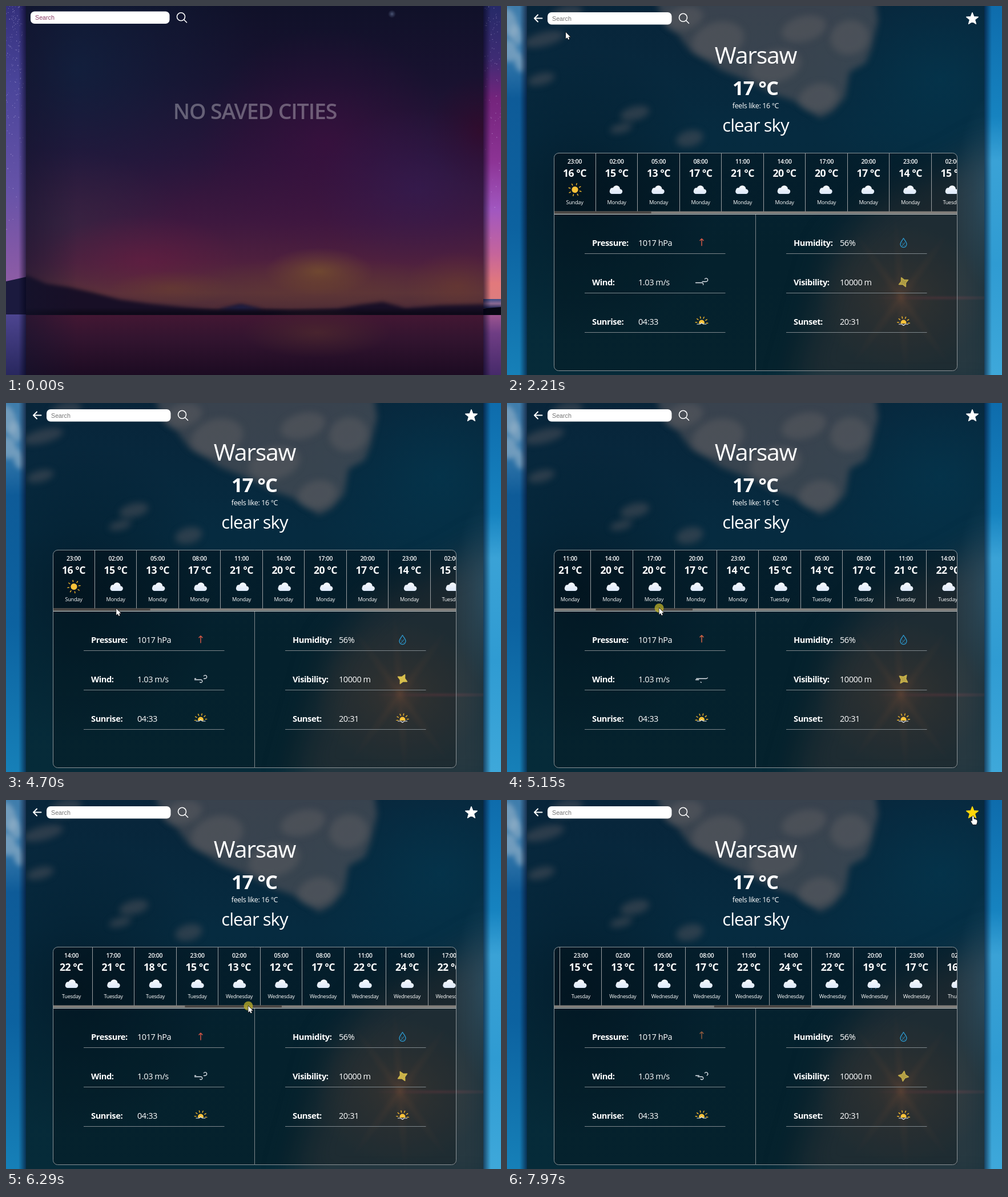
Recreate the animation shown at these times as an HTML page with a canvas. Size 867 px wide and 646 px high, loop 8 s.

```html
<!DOCTYPE html>
<html lang="en">
<head>
<meta charset="utf-8">
<title>Weather</title>
<style>
  html, body { margin: 0; width: 100%; height: 100%; overflow: hidden; background: #10122e; }
  canvas { display: block; }
</style>
</head>
<body>
<canvas id="stage" width="867" height="646"></canvas>
<script>
const W = 867, H = 646, LOOP = 8000, PANEL = { x: 35, w: 801 };
const ctx = document.getElementById('stage').getContext('2d');
const SANS = '"Open Sans", "Noto Sans", sans-serif', ARIAL = '"Liberation Sans", Arial, sans-serif';
const TAU = Math.PI * 2, LOAD = 1250, READY = 1940, GRAB = 4880, RELEASE = 6950, SAVE = 7600;

const clamp = (v, a, b) => Math.min(b, Math.max(a, v));
const ease = p => p * p * (3 - 2 * p);

function randomizer(seed) {
  return () => (seed = (seed * 16807) % 2147483647) / 2147483647;
}

// Interpolates rows of [time, x, y] with a soft start and end.
function along(keys, t) {
  const i = keys.findIndex(k => k[0] > t);
  if (i < 0) return keys.at(-1).slice(1);
  const a = keys[i - 1], b = keys[i], p = ease((t - a[0]) / (b[0] - a[0]));
  return [a[1] + (b[1] - a[1]) * p, a[2] + (b[2] - a[2]) * p];
}

/* ---------- backgrounds, painted once ---------- */

function gradient(c, x0, y0, x1, y1, stops) {
  const g = c.createLinearGradient(x0, y0, x1, y1);
  stops.forEach(([p, color]) => g.addColorStop(p, color));
  return g;
}

function band(c, x, y, w, h, stops, sideways) {
  c.fillStyle = gradient(c, x, y, sideways ? x + w : x, sideways ? y : y + h, stops);
  c.fillRect(x, y, w, h);
}

function glow(c, x, y, rx, ry, rgb, alpha) {
  c.save();
  c.translate(x, y);
  c.scale(rx, ry);
  const g = c.createRadialGradient(0, 0, 0, 0, 0, 1);
  g.addColorStop(0, `rgba(${rgb},${alpha})`);
  g.addColorStop(0.5, `rgba(${rgb},${alpha * 0.45})`);
  g.addColorStop(1, `rgba(${rgb},0)`);
  c.fillStyle = g;
  c.fillRect(-1, -1, 2, 2);
  c.restore();
}

function polygon(c, points, color) {
  c.beginPath();
  points.forEach(p => c.lineTo(...p));
  c.fillStyle = color;
  c.fill();
}

function puffs(c, list, color) {
  c.fillStyle = color;
  list.forEach(([x, y, rx, ry]) => {
    c.beginPath();
    c.ellipse(x, y, rx, ry, -0.25, 0, TAU);
    c.fill();
  });
}

function paintScene(paintSides, paintPanel) {
  const canvas = document.createElement('canvas');
  canvas.width = W;
  canvas.height = H;
  const c = canvas.getContext('2d');
  paintSides(c);
  band(c, 22, 0, 13, H, [[0, 'rgba(0,0,20,0)'], [1, 'rgba(0,0,20,.6)']], true);
  band(c, 836, 0, 13, H, [[0, 'rgba(0,0,20,.6)'], [1, 'rgba(0,0,20,0)']], true);
  c.save();
  c.beginPath();
  c.rect(PANEL.x, 0, PANEL.w, H);
  c.clip();
  paintPanel(c);
  c.restore();
  return canvas;
}

function nightSides(c) {
  band(c, 0, 0, 40, 540, [[0, '#34307c'], [0.25, '#4a459a'], [0.6, '#6653a8'], [0.8, '#8258a6'], [1, '#9a62a4']]);
  band(c, 830, 0, 37, 540, [[0, '#262a68'], [0.17, '#3e2c74'], [0.3, '#74247c'], [0.5, '#8c3394'],
    [0.66, '#a157c0'], [0.8, '#c4649c'], [0.9, '#e2797c'], [1, '#d88080']]);
  band(c, 836, 513, 31, 16, [[0, '#3a4c86'], [0.5, '#8c6a92'], [1, '#1b2450']]);
  polygon(c, [[830, 530], [867, 527], [867, 541], [830, 541]], '#070713');
  const rnd = randomizer(71);
  for (let i = 0; i < 240; i++) {
    const right = i % 3 === 0;
    c.fillStyle = `rgba(225,215,255,${0.15 + rnd() * 0.55})`;
    c.fillRect(right ? 838 + rnd() * 29 : rnd() * 30, rnd() * rnd() * 460, 1, 1);
  }
  polygon(c, [[0, 482], [14, 479], [36, 474], [36, 541], [0, 541]], '#1b1a3e');
  band(c, 0, 540, 40, 106, [[0, '#4d4590'], [1, '#28275e']]);
  band(c, 830, 541, 37, 105, [[0, '#9c5590'], [0.3, '#6f3d84'], [1, '#462a6a']]);
}

function nightPanel(c) {
  band(c, 0, 0, W, 540, [[0, '#101129'], [0.25, '#191230'], [0.5, '#2a143a'], [0.7, '#3e183f'],
    [0.83, '#4f203e'], [0.93, '#59323a'], [1, '#4a2a36']]);
  glow(c, 120, 110, 330, 300, '16,36,66', 0.7);
  glow(c, 90, 380, 220, 130, '54,42,66', 0.6);
  glow(c, 560, 240, 220, 200, '70,14,66', 0.5);
  glow(c, 830, 220, 90, 100, '60,4,36', 0.5);
  glow(c, 720, 320, 180, 140, '52,30,88', 0.5);
  glow(c, 240, 445, 170, 80, '108,28,66', 0.5);
  glow(c, 548, 465, 95, 42, '124,86,46', 0.75);
  glow(c, 550, 490, 240, 50, '104,62,44', 0.45);
  glow(c, 290, 494, 110, 30, '110,70,42', 0.45);
  glow(c, 790, 490, 90, 60, '112,62,44', 0.5);
  glow(c, 676, 14, 7, 7, '130,150,190', 0.5);
  c.filter = 'blur(3px)';
  polygon(c, [[20, 470], [40, 473], [70, 486], [110, 492], [150, 501], [200, 514], [250, 521], [310, 527], [370, 532],
    [410, 523], [450, 531], [500, 533], [580, 530], [620, 523], [660, 518], [700, 529], [760, 524], [850, 522],
    [850, 545], [20, 545]], '#180f26');
  polygon(c, [[370, 532], [412, 523], [450, 532]], '#1e2046');
  c.filter = 'none';
  band(c, 0, 528, W, 14, [[0, 'rgba(12,8,22,0)'], [0.7, 'rgba(12,8,22,.85)'], [1, 'rgba(12,8,22,.8)']]);
  band(c, 0, 541, W, 105, [[0, '#431733'], [0.4, '#32142f'], [1, '#1c0b22']]);
  glow(c, 545, 572, 130, 44, '86,48,44', 0.55);
  band(c, 35, 0, 90, H, [[0, 'rgba(18,20,46,.5)'], [1, 'rgba(18,20,46,0)']], true);
}

function daySides(c) {
  band(c, 0, 0, 40, H, [[0, '#3f7dac'], [0.12, '#3a7cae'], [0.25, '#0e5b98'], [0.6, '#0c62a0'], [1, '#1680b8']]);
  band(c, 830, 0, 37, H, [[0, '#0e6cac'], [0.3, '#1683c0'], [0.42, '#3aa2d6'], [0.7, '#2f9bd2'], [1, '#3ea8da']]);
  c.filter = 'blur(4px)';
  puffs(c, [[4, 30, 14, 26], [16, 50, 10, 18], [2, 78, 16, 20], [22, 98, 9, 18]], 'rgba(150,178,200,.6)');
  c.filter = 'none';
}

function dayPanel(c) {
  band(c, 0, 0, W, H, [[0, '#08253a'], [0.35, '#062b40'], [0.7, '#052a39'], [1, '#062b39']]);
  glow(c, 760, 130, 240, 220, '3,56,80', 0.65);
  glow(c, 130, 330, 240, 260, '2,22,36', 0.6);
  c.filter = 'blur(6px)';
  polygon(c, [[262, -10], [645, -10], [650, 25], [638, 75], [628, 100], [600, 115], [592, 160], [570, 185], [548, 196],
    [525, 180], [500, 165], [470, 155], [440, 140], [410, 126], [375, 112], [345, 92], [322, 80], [300, 50], [272, 28]],
    'rgba(90,88,92,.6)');
  puffs(c, [[600, 55, 34, 30], [545, 160, 34, 24], [470, 105, 46, 28], [370, 60, 46, 32], [310, 22, 34, 20],
    [520, 40, 40, 22]], 'rgba(104,100,102,.4)');
  puffs(c, [[320, 232, 24, 14], [224, 188, 26, 12], [200, 214, 20, 8], [65, 58, 36, 12], [105, 14, 28, 15],
    [60, 128, 24, 10]], 'rgba(92,90,96,.45)');
  c.filter = 'blur(28px)';
  polygon(c, [[860, 235], [790, 280], [650, 340], [570, 430], [500, 680], [860, 680]], 'rgba(72,70,72,.5)');
  c.filter = 'none';
  glow(c, 845, 330, 60, 170, '56,100,124', 0.5);
  glow(c, 690, 510, 150, 130, '104,74,58', 0.42);
  glow(c, 690, 510, 40, 40, '116,82,64', 0.3);
  glow(c, 760, 511, 120, 5, '130,70,80', 0.4);
  for (const angle of [0.95, 1.5, 2.2]) {
    c.save();
    c.translate(690, 510);
    c.rotate(angle);
    glow(c, 0, 0, 140, 10, '130,90,66', 0.2);
    c.restore();
  }
}

const night = paintScene(nightSides, nightPanel), day = paintScene(daySides, dayPanel);

/* ---------- drawing helpers ---------- */

function text(str, x, y, size, { weight = 400, align = 'center', color = '#fff', family = SANS } = {}) {
  ctx.font = `${weight} ${size}px ${family}`;
  ctx.letterSpacing = family === SANS ? `${-0.03 * size}px` : '0px';
  ctx.textAlign = align;
  ctx.fillStyle = color;
  ctx.fillText(str, x, y);
}

function box(x, y, w, h, r, fill, stroke) {
  ctx.beginPath();
  ctx.roundRect(x, y, w, h, r);
  if (fill) { ctx.fillStyle = fill; ctx.fill(); }
  if (stroke) { ctx.strokeStyle = stroke; ctx.lineWidth = 1; ctx.stroke(); }
}

function rect(x, y, w, h, color) {
  ctx.fillStyle = color;
  ctx.fillRect(x, y, w, h);
}

function disc(x, y, r, color) {
  ctx.beginPath();
  ctx.arc(x, y, r, 0, TAU);
  ctx.fillStyle = color;
  ctx.fill();
}

function line(d, color, width) {
  ctx.strokeStyle = color;
  ctx.lineWidth = width;
  ctx.lineCap = ctx.lineJoin = 'round';
  ctx.stroke(new Path2D(d));
}

function at(x, y, angle, draw) {
  ctx.save();
  ctx.translate(x, y);
  ctx.rotate(angle);
  draw();
  ctx.restore();
}

function star(points, outer, inner, color) {
  ctx.beginPath();
  for (let i = 0; i < points * 2; i++) {
    const r = i % 2 ? inner : outer, a = i * Math.PI / points - Math.PI / 2;
    ctx.lineTo(r * Math.cos(a), r * Math.sin(a));
  }
  ctx.closePath();
  ctx.fillStyle = ctx.strokeStyle = color;
  ctx.lineJoin = 'round';
  ctx.lineWidth = 1.5;
  ctx.fill();
  ctx.stroke();
}

function searchBar(x, y, w, value, color, caret) {
  box(x, y, w, 21.5, 7, '#fff');
  text(value, x + 8, y + 14.5, 10.7, { align: 'left', color, family: ARIAL });
  if (caret) rect(x + 9 + ctx.measureText(value).width, y + 4, 1, 13, '#222');
  at(x + w + 20, y + 9.3, 0, () => line('M7 0A7 7 0 1 1-7 0A7 7 0 1 1 7 0M5 5L10 10', '#fff', 1.6));
}

/* ---------- weather icons ---------- */

function rays(from, to, count, start, step) {
  for (let i = 0; i < count; i++) {
    const a = start + i * step, c = Math.cos(a), s = Math.sin(a);
    line(`M${c * from} ${s * from}L${c * to} ${s * to}`, '#f5b92c', 1.4);
  }
}

function sunIcon(x, y, t) {
  at(x, y, t / 6000 * Math.PI / 4, () => {
    disc(0, 0, 5.6, '#fac23a');
    rays(8.7, 11.3, 8, 0, Math.PI / 4);
  });
}

function cloudIcon(x, y, rain, t) {
  const color = gradient(ctx, x, y - 8, x, y + 8, [[0, '#f8fafe'], [1, '#dbe7f8']]);
  if (rain) {
    for (let i = 0; i < 3; i++) {
      const p = (t / 700 + i * 0.37) % 1;
      at(x - 4 + i * 4, y + 6 + p * 5, 0, () => line('M0 0L-.7 2', `rgba(60,150,220,${1 - p})`, 1));
    }
  }
  box(x - 11, y - 1.5, 22.5, 8.5, 4.2, color);
  disc(x - 6, y + 0.5, 4.3, color);
  disc(x + 1, y - 1.5, 6.3, color);
}

function pressureIcon(t) {
  const p = ((t + 2230) % 2600) / 2600, fade = Math.min(1, p * 8, 0.3 + (1 - p) * 5);
  at(341, 414 - 3.5 * p ** 6, 0, () =>
    line('M0 6V-6M-3-3L0-6L3-3', `rgba(232,${90 + 70 * p ** 8},72,${0.9 * fade})`, 1.5));
}

function windIcon(t) {
  const travel = (t - 4700) / 795 * 34;
  ctx.save();
  ctx.setLineDash([20, 14]);
  ctx.lineDashOffset = -travel - 16;
  line('M330.5 482.5H349A2.9 2.9 0 1 0 346.4 478', '#e4e8ee', 1.3);
  ctx.lineDashOffset = -travel;
  line('M330.5 484.5H341.5A2.5 2.5 0 1 1 339.3 488.5', '#e4e8ee', 1.3);
  ctx.restore();
}

function humidityIcon() {
  line('M694.5 406.5C692 411 689 413.5 689 417A5.5 5.5 0 0 0 700 417C700 413.5 697 411 694.5 406.5Z', '#2c93c6', 1.4);
  line('M696.5 414.5L692.5 419.5M692.4 415V415.2M696.7 419V419.2', '#2c93c6', 1.2);
}

function visibilityIcon(t) {
  ctx.globalAlpha = 0.8 + 0.2 * Math.cos((t - 4700) / 1900 * TAU);
  at(694.5, 483.5, (t - 3410) * 0.0214 * Math.PI / 180, () => star(4, 9, 4.2, '#d8bf4c'));
  ctx.globalAlpha = 1;
}

function horizonIcon(x, setting, t) {
  ctx.save();
  ctx.beginPath();
  ctx.rect(x - 14, 538, 28, 18);
  ctx.clip();
  at(x, 554.5, 0, () => {
    disc(0, 0, 5, '#fac23a');
    rays(8, 10.8, 6, -Math.PI + 0.12 * Math.sin(t / 900), Math.PI / 5);
  });
  ctx.restore();
  const dip = setting ? 2.2 : -2.2;
  at(x, 557, 0, () => line(`M-8 0H-3.2L0 ${dip}L3.2 0H8`, '#eef1f5', 1.2));
}

/* ---------- screens ---------- */

const cities = ['Warsaw, PL', 'Warsaw, US', 'Warsaw, IN', 'Warsaw, MO', 'Warsaw, NY'];

function homeScreen(t) {
  const typed = 'Warsaw'.slice(0, clamp(Math.floor((t - 290) / 70), 0, 6));
  searchBar(43, 9.5, 243.5, typed || 'Search', typed ? '#111' : '#8c3c68', t > 250 && t % 1000 < 800);
  text('NO SAVED CITIES', 436, 198, 37.5, { weight: 600, color: 'rgba(255,255,255,.32)' });
  if (t < 740) return;
  box(43.5, 33.5, 243, 121, 6, 'rgba(10,10,30,.75)', 'rgba(255,255,255,.3)');
  if (t > 860) rect(44, 34, 242, 24, 'rgba(255,255,255,.18)');
  cities.forEach((city, i) => text(city, 52, 50 + i * 24, 11, { align: 'left' }));
}

function spinner(t) {
  at(436, 328.5, ((t - 1550) * 0.36 - 26) * Math.PI / 180, () => {
    ctx.beginPath();
    ctx.arc(0, 0, 54.5, -Math.PI / 2, Math.PI / 2);
    ctx.ellipse(0, 0, 52, 54.5, 0, Math.PI / 2, -Math.PI / 2, true);
    ctx.fillStyle = '#fff';
    ctx.fill();
  });
}

function statusBar() {
  box(-5, 633, 126, 18, 3, '#2a2b3d');
  text('37172&lon=21.071432235636493', 117, 642.5, 7.6, { align: 'right', color: '#aeb0bc' });
}

const temperatures = [16, 15, 13, 17, 21, 20, 20, 17, 14, 15, 14, 17, 21, 22, 21, 18, 15, 13, 12, 17, 22, 24, 22, 19, 17, 16];
const days = ['Sunday', 'Monday', 'Tuesday', 'Wednesday', 'Thursday'];
const CELL = 73.5, VIEW = 706, TRACK = 40 * CELL, THUMB_END = 279.8;

function forecast(t, thumb) {
  const scroll = thumb * TRACK / VIEW, sway = 1.4 * Math.cos((t - 4900) / 6000 * TAU);
  ctx.save();
  ctx.beginPath();
  ctx.roundRect(83, 258, VIEW - 1, 107, [8, 8, 0, 0]);
  ctx.clip();
  rect(83, 258, VIEW, 102, 'rgba(0,0,0,.3)');
  temperatures.forEach((degrees, i) => {
    const x = 118.5 + i * CELL - scroll, hour = (23 + 3 * i) % 24;
    if (x < 40 || x > 830) return;
    text(`${String(hour).padStart(2, '0')}:00`, x, 276, 10.4, { weight: 600 });
    text(`${degrees} °C`, x, 298.5, 17.7, { weight: 700 });
    if (i) cloudIcon(x + sway, 322, i === 23, t);
    else sunIcon(x + 0.5, 321.5, t);
    text(days[Math.floor((23 + 3 * i) / 24)], x, 347, 9.2);
    rect(Math.floor(x + 36.5), 258, 1, 102, '#9a9ea1');
  });
  rect(83, 359.5, VIEW, 4, '#85817d');
  rect(83 + thumb, 359.5, VIEW * VIEW / TRACK, 4, '#4b4744');
  rect(83, 364, VIEW, 1, '#d5d5d2');
  ctx.restore();
}

function detail(label, value, column, row) {
  const x = 149 + column * 353, y = 419.5 + row * 69;
  text(label, x, y, 14.7, { weight: 700, align: 'left' });
  text(value, x + 81, y, 14.5, { align: 'left' });
  rect(x - 13, y + 13.5, 246.5, 1, '#7d868b');
}

function cityScreen(t, thumb) {
  line('M61.5 21.5H48M54 15.5L48 21.5L54 27.5', '#fff', 2);
  searchBar(71, 11, 217.5, 'Search', '#757575', false);
  at(815, 22.5, 0, () => star(5, 10.8, 4.6, t < SAVE ? '#fff' : '#ffd60a'));
  text('Warsaw', 435.5, 101, 41);
  text('17 °C', 435, 156, 34.5, { weight: 700 });
  text('feels like: 16 °C', 435.5, 179, 12.5);
  text('clear sky', 435.5, 219.5, 31);

  rect(83, 365, 705, 273, 'rgba(0,0,0,.22)');
  forecast(t, thumb);
  box(82.5, 257.5, VIEW, 381, 8, null, '#8b9296');
  rect(435, 365, 1, 273, '#7f878b');

  detail('Pressure:', '1017 hPa', 0, 0);
  detail('Wind:', '1.03 m/s', 0, 1);
  detail('Sunrise:', '04:33', 0, 2);
  detail('Humidity:', '56%', 1, 0);
  detail('Visibility:', '10000 m', 1, 1);
  detail('Sunset:', '20:31', 1, 2);
  pressureIcon(t);
  windIcon(t);
  humidityIcon();
  visibilityIcon(t);
  horizonIcon(341, false, t);
  horizonIcon(694.5, true, t);
}

/* ---------- pointer ---------- */

const pointerPath = [
  [0, -12, 120], [250, 100, 20], [760, 100, 20], [880, 103, 46], [3700, 103, 46], [4450, 192, 360], [GRAB, 194, 360],
  [5510, 377.2, 357.5], [6290, 424.4, 360.5], [6900, 474, 361], [7040, 474, 361], [7360, 816, 29], [LOOP, 816, 29]
];
const presses = [[1180, LOAD], [GRAB, RELEASE], [7540, 7640]];
const arrowShape = new Path2D('M0 0V11.2L2.6 8.9L4.3 12.8L6.2 12L4.5 8.2H8Z');
const handShape = new Path2D('M-1 0Q.8-1.6 1.6 .4V4.6Q3 3.8 3.8 5Q5.2 4.4 5.8 5.7Q7.4 5.5 7.4 7.2V10L6 14H0L-3.2 9Q-4 7-2.2 7.2L-1 8.6Z');

function pointer(t, [x, y]) {
  if (presses.some(([from, to]) => t >= from && t < to)) disc(x, y, 8, 'rgba(190,176,40,.75)');
  at(x, y, 0, () => {
    const shape = t > 7330 ? handShape : arrowShape;
    ctx.lineWidth = 1.4;
    ctx.strokeStyle = '#111';
    ctx.fillStyle = '#fff';
    ctx.stroke(shape);
    ctx.fill(shape);
  });
}

function render(t) {
  const position = along(pointerPath, t);
  const thumb = t < GRAB ? 0 : t < RELEASE ? clamp(position[0] - 194, 0, THUMB_END) : THUMB_END;
  ctx.drawImage(t < READY ? night : day, 0, 0);
  if (t < LOAD) homeScreen(t);
  else if (t < READY) spinner(t);
  else cityScreen(t, thumb);
  if (t > 880 && t < 2100) statusBar();
  pointer(t, position);
}

const start = performance.now();
function tick() {
  render((performance.now() - start) % LOOP);
  requestAnimationFrame(tick);
}
tick();
</script>
</body>
</html>
```
